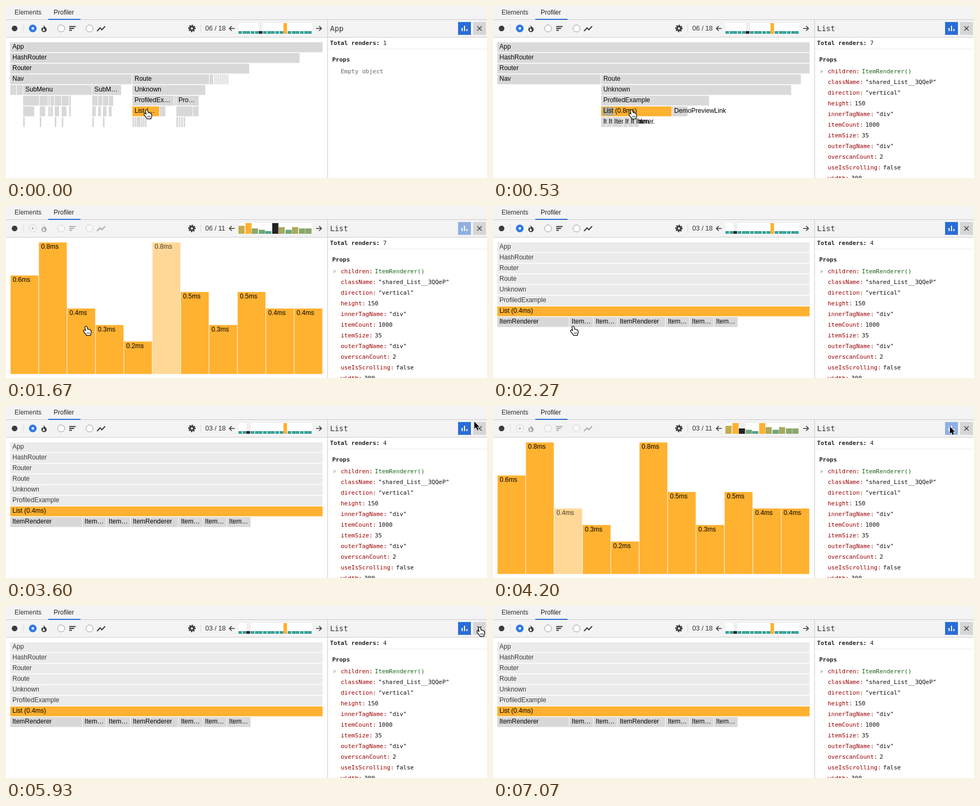
These frames come from a looping animation (898x322 px, 7140 ms). An HTML page with a canvas:

```html
<!DOCTYPE html>
<html>
<head>
<meta charset="utf-8">
<style>
  html, body { margin: 0; width: 100%; height: 100%; overflow: hidden; background: #fff; }
  canvas { display: block; }
</style>
</head>
<body>
<canvas id="stage" width="898" height="322"></canvas>
<script>
const c = document.getElementById('stage').getContext('2d');
const LOOP = 7140;
const SANS = '12px "Liberation Sans", Arial, sans-serif';
const MONO = '11px "DejaVu Sans Mono", monospace';
const ORANGE = '#ffb130', GREY = '#d8d8d8', BAR = '#f3f3f3', LINE = '#cbcbcb', INK = '#3b3b3b', BLUE = '#2a6cd6';

// Timeline of hard changes
const CLICK = 470, TO_CHART = 600, PICK = 2130, TO_FLAME = 2270,
      BUTTON = 4000, CLOSE = 5600, LEAVE = 6200;

const durations = [.6, .8, .4, .3, .2, .8, .5, .3, .5, .4, .4];
const props = {
  children: 'ItemRenderer()', className: '"shared_List__3QQeP"', direction: '"vertical"',
  height: 150, innerTagName: '"div"', itemCount: 1000, itemSize: 35,
  outerTagName: '"div"', overscanCount: 2, useIsScrolling: false, width: 300
};
// Pointer moves: start, end, x, y
const moves = [
  [0, 470, 258.5, 194.5], [800, 1400, 149.5, 225.5], [2780, 3400, 886, 24],
  [3400, 3900, 853, 38.5], [4560, 5100, 884, 40]
];

const smooth = u => (u = Math.min(1, Math.max(0, u)), u * u * (3 - 2 * u));
const mix = (a, b, p) => a + (b - a) * p;

// Flame graph: siblings laid side by side from x, as label/width pairs
const tree = [];
function row(depth, x, ...pairs) {
  for (let i = 0; i < pairs.length; i += 2) {
    tree.push({ label: pairs[i], depth, l: x, r: x += pairs[i + 1] });
  }
}
const items = (weights, unit) => weights.flatMap(w => ['ItemRenderer', w * unit]);

row(0, 8, 'App', 584);
row(1, 8, 'HashRouter', 541);
row(2, 8, 'Router', 447);
row(3, 8, 'Nav', 228, 'Route', 144, '', 8);
row(4, 8, '', 12, '', 12, 'SubMenu', 129, 'SubMenu', 55);
row(4, 236, 'Unknown', 137);
row(5, 236, 'ProfiledExample', 78, '', 4, 'ProfiledExample', 42.5);
row(6, 236, 'List (0.8ms)', 51, 'DemoPreviewLink', 11.5);
row(6, 318, '', 31.5, '', 11);
row(7, 236, ...items([1, 1, 2, 1, 1, 1], 3.93));
for (let i = 0; i < 8; i++) row(3, 389 + i * 3.4, '', 3);
for (let i = 0; i < 4; i++) row(7, 318 + i * 4.5, '', 4);
// Menu entries shrink level by level; only wide ones reach the last row
for (const edges of [[32, 63, 79, 83, 91, 104, 118, 122], [161, 172, 181, 192, 201]]) {
  edges.slice(1).forEach((end, i) => {
    const x = edges[i], w = end - x;
    row(5, x, '', w);
    row(6, x, '', Math.max(4, w * .7));
    if (w > 10) row(7, x, '', 4);
  });
}

function box(x, y, w, h, color) {
  c.fillStyle = color;
  c.fillRect(x, y, w, h);
}
function text(s, x, y, color = '#000', font = SANS) {
  c.font = font;
  c.fillStyle = color;
  c.fillText(s, x, y);
}
function disc(x, y, r, fill, stroke) {
  c.beginPath();
  c.arc(x, y, r, 0, 7);
  if (fill) { c.fillStyle = fill; c.fill(); }
  if (stroke) { c.strokeStyle = stroke; c.lineWidth = 1; c.stroke(); }
}
function stroke(d, color = INK, width = 1.5) {
  c.strokeStyle = color;
  c.lineWidth = width;
  c.stroke(new Path2D(d));
}
function fit(s, room) {
  c.font = SANS;
  if (c.measureText(s).width <= room) return s;
  while (s && c.measureText(s + '…').width > room) s = s.slice(0, -1);
  return s.trimEnd() + '…';
}

// Dimmed parts fade their text half as much as their fill
function bar(x, y, w, h, color, label, dim) {
  c.globalAlpha = 1 - dim / 2;
  box(x, y, w, h, color);
  c.globalAlpha = 1 - dim / 4;
  text(label, x + 4, Math.round(y + 12));
  c.globalAlpha = 1;
}

function node({ label, depth, l, r }, color, dim = 0, room = r - l) {
  const x = Math.max(8, l);
  bar(x, 68 + depth * 20, Math.min(592, r) - x - 1, 18.5, color, room < 35 ? '' : fit(label, room - 9), dim);
}

function zoomingFlame(t) {
  const p = smooth((t - CLICK) / 250);
  const goal = x => 8 + (x - 236) * 11.68;
  for (const n of tree) {
    const gl = goal(n.l), gr = goal(n.r), isList = n.label.startsWith('List');
    if (p && (gr < 7 || gl > 610)) continue;
    const isParent = n.depth < 6 && n.l <= 236 && n.r >= 286;
    const l = mix(n.l, gl, p), r = mix(n.r, gr, p);
    node({ ...n, l, r }, isList ? ORANGE : GREY, isParent ? p : 0, p ? gr - gl : n.r - n.l);
    if (isList && p) {
      box(l + 3, 189, 20, 16, '#adab9c');
      text('List', l + 4, 200);
    }
  }
}

function smallFlame() {
  const full = { l: 8, r: 592 };
  ['App', 'HashRouter', 'Router', 'Route', 'Unknown', 'ProfiledExample']
    .forEach((label, depth) => node({ ...full, label, depth }, GREY, 1));
  node({ ...full, label: 'List (0.4ms)', depth: 6 }, ORANGE);
  let x = 8;
  for (const w of [3, 1, 1, 2, 1, 1, 1]) {
    node({ label: 'ItemRenderer', depth: 7, l: x, r: x += w * 44.95 }, GREY);
  }
}

function chart(selected) {
  durations.forEach((d, i) => {
    const h = d * 309;
    bar(8.5 + i * 53, 315.5 - h, 52, h - 1, ORANGE, d + 'ms', i === selected ? 1 : 0);
  });
}

function heat(d) {
  const u = (d - .1) / .7;
  return `rgb(${mix(51, 255, u)}, ${mix(161, 177, u)}, ${mix(152, 48, u)})`;
}

function minimap(isChart, selected) {
  const n = isChart ? 11 : 18, w = 138 / n;
  box(434, 32, 138, 20, '#fff');
  for (let i = 0; i < n; i++) {
    const d = isChart ? durations[i] : i === 11 ? .8 : .1;
    const x = Math.round(434 + i * w), h = Math.max(5, d * 25);
    if (i === selected) box(x, 32, w, 20, '#efefef');
    box(x, 52 - h, Math.floor(w) - (isChart ? 0 : 1) + (isChart ? -.5 : 0.7), h, i === selected ? '#222' : heat(d));
  }
}

function toolbar(isChart, selected) {
  box(0, 0, 898, 58, BAR);
  box(0, 25, 898, 1, LINE);
  box(0, 58, 898, 1, LINE);
  box(79, 24, 60, 2, BLUE);
  text('Elements', 16, 16, '#333');
  text('Profiler', 89, 16, '#222');
  disc(16, 42, 5.3, INK);
  box(32, 34, 1, 16, '#dcdcdc');
  box(363, 34, 1, 16, '#dcdcdc');

  c.globalAlpha = isChart ? .4 : 1;
  disc(50, 42, 6.7, isChart ? '#fff' : '#2a7bea', isChart ? '#999' : BLUE);
  disc(50, 42, 2.4, isChart ? '#777' : '#fff');
  c.fillStyle = INK;
  c.fill(new Path2D('M70.5 35.5C71 39 76 40 76 44A5 5 0 0 1 66 44C66 42 67 40.6 68 39.4Q68 41.4 69.4 41.6C70.6 40 70 37.5 70.5 35.5ZM71 42Q68 43 68.5 45A2 2 0 0 0 72.6 45Z'), 'evenodd');
  disc(103, 42, 6.5, '#fff', '#999');
  stroke('M118 38.5H130M118 42H127M118 45.5H123', INK, 2);
  disc(156, 42, 6.5, '#fff', '#999');
  stroke('M170 47L175.5 41 179 44.5 185 38', INK, 2);
  c.globalAlpha = 1;

  c.strokeStyle = INK;
  c.lineWidth = 3;
  c.beginPath(); c.arc(347, 42, 3.6, 0, 7); c.stroke();
  c.setLineDash([2.4, 1.92]);
  c.beginPath(); c.arc(347, 42, 5.5, -.2, Math.PI * 2 - .2); c.stroke();
  c.setLineDash([]);
  text(`0${selected + 1} / ${isChart ? 11 : 18}`, 372, 46, '#333', SANS.replace('12px', '12.5px'));
  stroke('M427 42H417.5M421.5 37.5L417 42 421.5 46.5M579 42H588.5M584.5 37.5L589 42 584.5 46.5');
  minimap(isChart, selected);
}

function panel(name, renders, isChart) {
  box(600, 26, 1, 296, LINE);
  text(name, 605, 47, '#333', MONO.replace('11', '14'));
  box(844, 30, 24, 24, isChart ? '#8fb0e4' : BLUE);
  stroke('M851.5 47V41M856 47V37M860.5 47V43', '#fff', 2);
  box(872, 30, 24, 24, '#d6d6d6');
  stroke('M880 38L888 46M888 38L880 46', '#444', 1.6);
  text('Total renders:', 605, 73, '#222', 'bold ' + MONO);
  text(renders, 704, 73, '#222', MONO);
  box(601, 80, 297, 1, '#eee');
  text('Props', 609, 104, '#222', 'bold ' + MONO);
  if (name === 'App') return text('Empty object', 625, 126, '#666', MONO);
  c.fillStyle = '#ccc';
  c.fill(new Path2D('M611.5 119L617 122.5 611.5 126Z'));
  Object.entries(props).forEach(([key, value], i) => {
    const y = 126 + i * 20;
    text(key + ':', 625, y, '#9b0000', MONO);
    text(value, 629 + (key.length + 1) * 6.62, y, i ? '#111' : '#1a661a', MONO);
  });
}

const hand = new Path2D('M-1.6 1.4Q0-1 1.6 1.4L2.6 6Q3.8 5 4.8 6.3Q6 5.5 6.8 7Q8.4 6.6 8.8 8.6L9 11.5Q8.8 13 7.8 14.4V16.3H1.4L0 14-3.8 9.6Q-5 7-3 7L0 9Z');
const arrow = new Path2D('M0 0V13.5L3 10.7 5 15.6 7.6 14.6 5.5 9.8H9.6Z');

function pointer(t) {
  if (t >= LEAVE) return;
  let x = 262.5, y = 194.5;
  for (const [from, to, toX, toY] of moves) {
    const p = smooth((t - from) / (to - from));
    x = mix(x, toX, p);
    y = mix(y, toY, p);
  }
  const isHand = t < 2860 || (t > 3680 && t < BUTTON) || t > 4880;
  c.save();
  c.translate(x, y);
  c.lineJoin = 'round';
  c.lineWidth = isHand ? 2.4 : 1.6;
  c.strokeStyle = isHand ? '#000' : '#fff';
  c.fillStyle = isHand ? '#fff' : '#000';
  const shape = isHand ? hand : arrow;
  c.stroke(shape);
  c.fill(shape);
  if (isHand) stroke('M2.2 11V14M4.3 11V14M6.3 11V14', '#000', .8);
  c.restore();
}

function draw(t) {
  const isChart = (t >= TO_CHART && t < TO_FLAME) || (t >= BUTTON && t < CLOSE);
  const selected = t < PICK ? 5 : 2;
  box(0, 0, 898, 322, '#fff');
  if (isChart) chart(selected);
  else if (t < TO_CHART) zoomingFlame(t);
  else smallFlame();
  toolbar(isChart, selected);
  panel(t < CLICK ? 'App' : 'List', t < CLICK ? 1 : t < PICK ? 7 : 4, isChart);
  pointer(t);
}

const start = performance.now();
function tick() {
  draw((performance.now() - start) % LOOP);
  requestAnimationFrame(tick);
}
tick();
</script>
</body>
</html>
```
